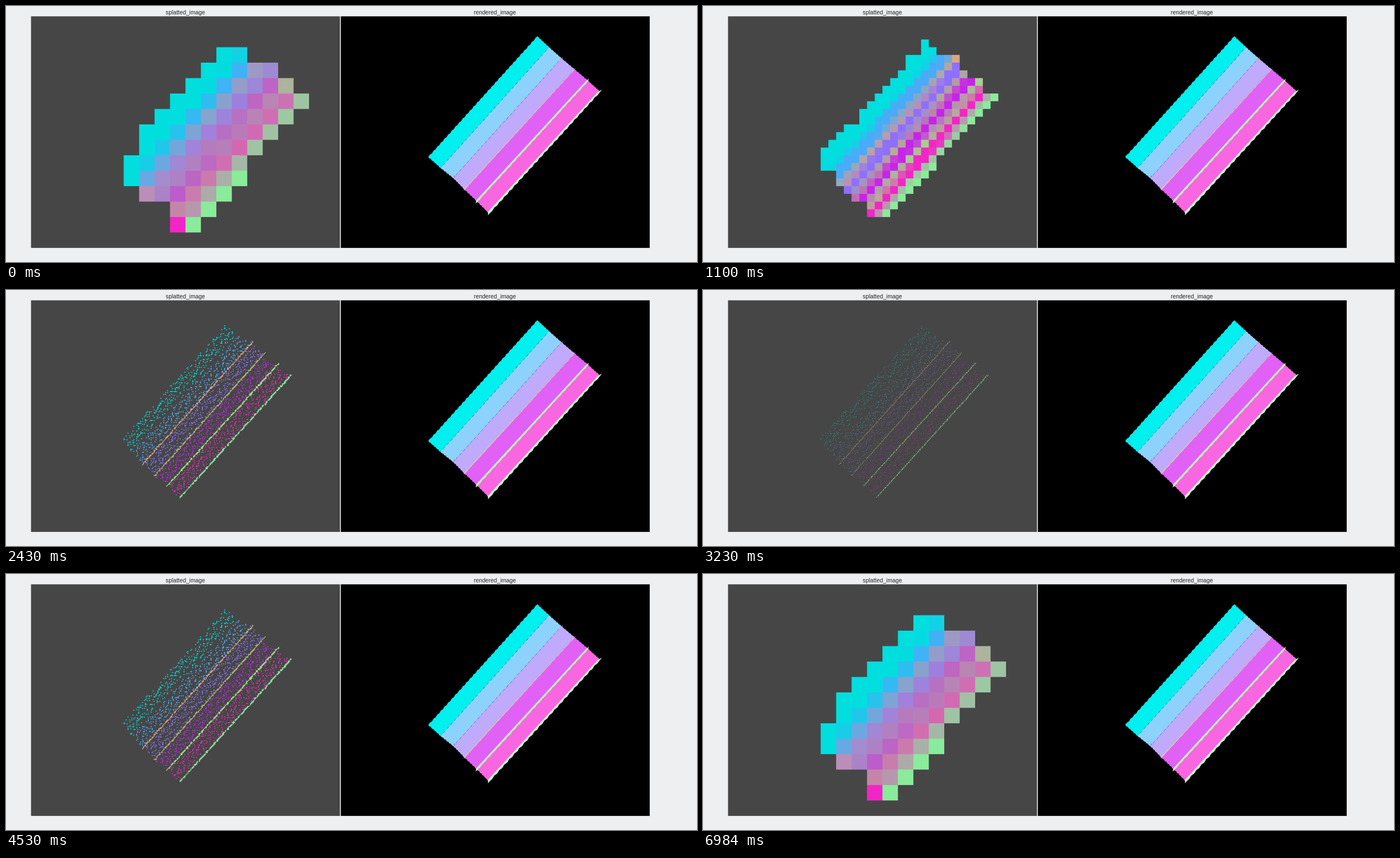
An HTML page with a canvas that plays this animation: 1229x456 px, repeating every 8000 ms.

```html
<!DOCTYPE html>
<html lang="en">
<head>
<meta charset="utf-8">
<title>splatted_image / rendered_image</title>
<style>
  html, body { margin: 0; width: 100%; height: 100%; overflow: hidden; background: #eeeff0; }
  svg, canvas { position: absolute; left: 0; top: 0; }
  text { font: 10.3px "Liberation Sans", Arial, sans-serif; fill: #222; text-anchor: middle; }
</style>
</head>
<body>
<svg id="stage" width="1229" height="456" viewBox="0 0 1229 456">
  <text x="319" y="15.2">splatted_image</text>
  <text x="869.5" y="15.2">rendered_image</text>
  <rect x="44.5" y="18.4" width="549.4" height="412.5" fill="#464646"/>
  <rect x="595.5" y="18.4" width="549.4" height="412.5" fill="#000"/>
</svg>
<canvas id="splats" width="1229" height="456"></canvas>
<script>
const LOOP = 8000;
// [start ms, grid columns]
const STEPS = [[0, 20], [500, 40], [1500, 160], [2430, 320], [3230, 640], [4530, 320], [5460, 20]];
const PANEL = { x: 44.5, y: 18.4, w: 549.4, h: 412.5 };

const mix = (a, b, t) => a + (b - a) * t;
const lerp = (p, q, t) => [mix(p[0], q[0], t), mix(p[1], q[1], t)];

// ---- rendered stairs -------------------------------------------------
const stage = document.getElementById('stage');

function poly(points, fill) {
  const el = document.createElementNS('http://www.w3.org/2000/svg', 'polygon');
  el.setAttribute('points', points.map(p => p.map(v => v.toFixed(2)).join()).join(' '));
  el.setAttribute('fill', fill);
  stage.append(el);
}

// A straight edge with small teeth across its direction.
function rough(p, q, teeth, amp) {
  const len = Math.hypot(q[0] - p[0], q[1] - p[1]);
  const nx = (q[1] - p[1]) / len, ny = (p[0] - q[0]) / len;
  const out = [p];
  for (let i = 1; i < teeth * 2; i++) {
    const [x, y] = lerp(p, q, i / (teeth * 2));
    const off = i % 2 ? amp : -amp;
    out.push([x + nx * off, y + ny * off]);
  }
  return [...out, q];
}

const tops = [[945, 54], [966, 73.5], [988, 93], [1011, 112.5], [1034, 132], [1055, 151]];
const feet = [[751, 269], [773, 288.5], [795.5, 306.5], [815, 326.5], [837, 347.5], [858, 368.5]];
['#00efef', '#8dd2fc', '#c0aafb', '#e160f6', '#f866e1'].forEach((fill, i) => poly([
  ...rough(tops[i], tops[i + 1], 5, 0.4),
  ...rough(tops[i + 1], feet[i + 1], 30, 0.2),
  ...rough(feet[i + 1], feet[i], 5, 0.5),
  ...rough(feet[i], tops[i], 30, i ? 0.2 : 0.6)
], fill));
poly([[991, 90.5], [988, 95.5], [986.5, 94.5]], '#b8a898');
poly([[1013.5, 109.5], ...rough([1011, 113.6], [816, 327], 24, 0.25), [814, 329], [814.6, 326]], '#d5cdae');
poly([[1037, 129.5], ...rough([1034.5, 135], [839, 348.5], 22, 0.4), [835.5, 352], [836, 346.5], [1032, 133]], '#b9f0b4');
poly([[1060, 149], ...rough([1056, 154], [860, 369.5], 22, 0.7), [857.5, 373], [857, 367], [1053, 152.5]], '#b9fbc0');
poly([[797, 302.5], [798.2, 302.5], [798.2, 304], [797, 304]], '#4a3f70');

// ---- point cloud -----------------------------------------------------
let seed = 20177;
function rand() {
  seed = (seed + 0x6D2B79F5) | 0;
  let t = Math.imul(seed ^ (seed >>> 15), 1 | seed);
  t = (t + Math.imul(t ^ (t >>> 7), 61 | t)) ^ t;
  return ((t ^ (t >>> 14)) >>> 0) / 4294967296;
}

const cloud = [];

// Spread n points over the quad a-b (top) to c-d (foot).
function scatter(n, color, a, b, c, d) {
  const rgb = [1, 3, 5].map(i => parseInt(color.slice(i, i + 2), 16));
  for (let i = 0; i < n; i++) {
    const s = (i + rand()) / n;
    const v = (i * 0.618034 + rand() * 0.45) % 1;
    const [x, y] = lerp(lerp(a, b, v), lerp(c, d, v), s);
    cloud.push({ x, y, rgb });
  }
}

// treads
scatter(340, '#00dede', [389.5, 60.9], [409, 79], [204.6, 267], [222, 286]);
scatter(400, '#4baaf9', [412, 80.5], [436, 92.5], [222.8, 286.6], [241, 308]);
scatter(400, '#8e70ff', [437, 95], [456, 112], [244.5, 311], [262, 327]);
scatter(400, '#c724ea', [456, 121.8], [480, 132], [265, 332], [284, 344]);
scatter(380, '#f226c6', [481, 136], [504, 151], [287, 350], [306, 367]);
// risers
scatter(230, '#dda582', [438.5, 90], [439.5, 91], [240.8, 310], [241.6, 311]);
scatter(240, '#bab784', [459, 111], [460.6, 111.4], [262.6, 330], [264, 330.8]);
scatter(320, '#9eea83', [483.6, 129.6], [486, 129], [284, 348.8], [287, 347.6]);
scatter(350, '#8aeb9b', [505.4, 150.4], [508.5, 150], [307.4, 369.3], [310.6, 367.6]);

// ---- splatting -------------------------------------------------------
const ctx = document.getElementById('splats').getContext('2d');

function splat(cols) {
  const rows = cols * 3 / 4;
  const cw = PANEL.w / cols, ch = PANEL.h / rows;
  const cells = new Map();
  for (const { x, y, rgb } of cloud) {
    const c = Math.round((x - PANEL.x) / cw), r = Math.round((y - PANEL.y) / ch);
    const key = r * cols + c;
    if (!cells.has(key)) cells.set(key, { c, r, n: 0, sum: [0, 0, 0] });
    const cell = cells.get(key);
    cell.n++;
    rgb.forEach((v, i) => cell.sum[i] += v);
  }
  ctx.clearRect(0, 0, 1229, 456);
  // additive coverage keeps neighbouring cells free of seams
  ctx.globalCompositeOperation = 'lighter';
  for (const { c, r, n, sum } of cells.values()) {
    ctx.fillStyle = `rgb(${sum.map(v => Math.round(v / n)).join()})`;
    ctx.fillRect(PANEL.x + c * cw, PANEL.y + r * ch, cw, ch);
  }
  ctx.globalCompositeOperation = 'source-over';
}

let shown = 0;
const start = performance.now();
function tick() {
  const t = (performance.now() - start) % LOOP;
  const cols = STEPS.findLast(step => step[0] <= t)[1];
  if (cols !== shown) splat(shown = cols);
  requestAnimationFrame(tick);
}
tick();
</script>
</body>
</html>
```
